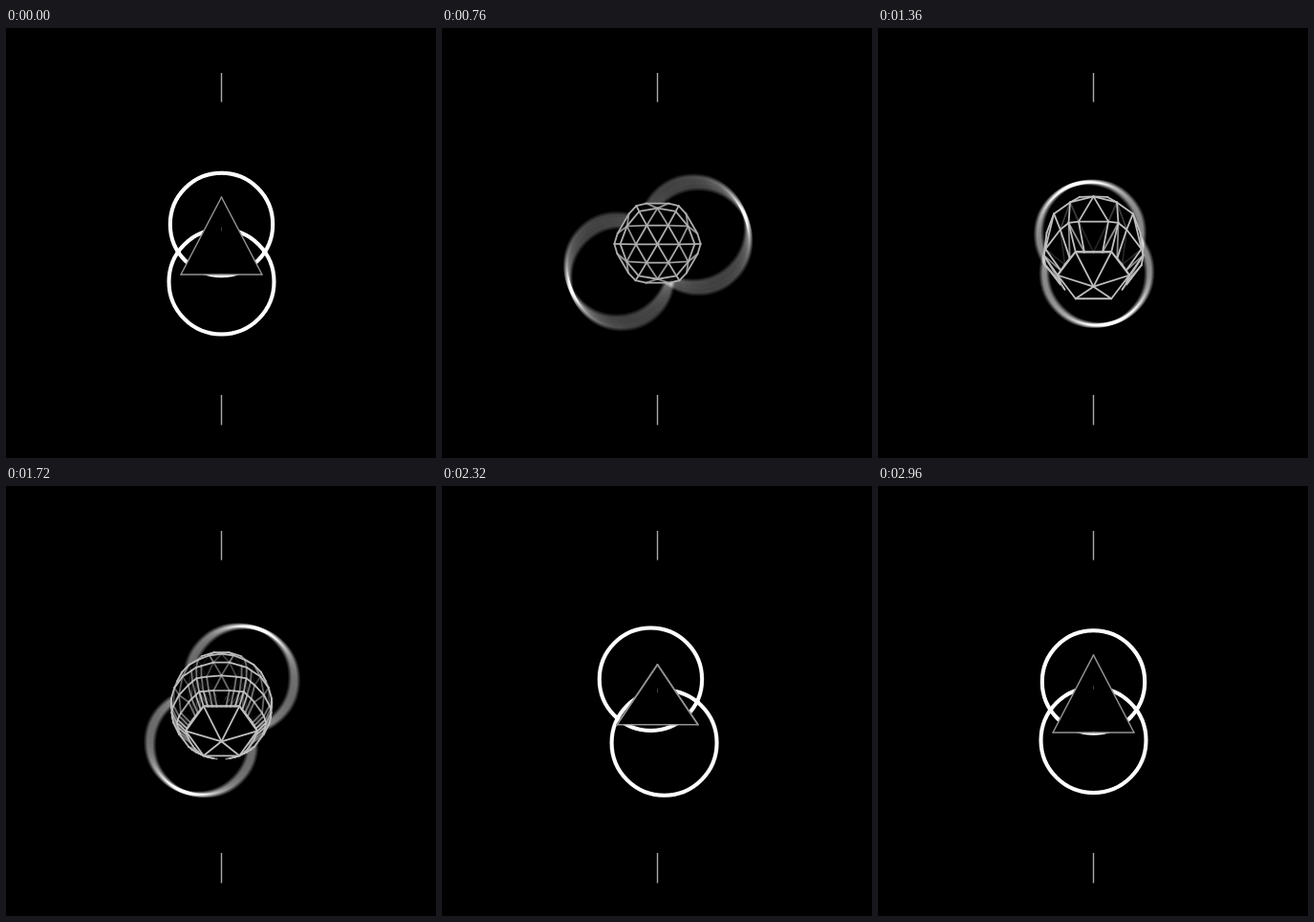
Write an HTML page with a canvas that moves like this. It is 450 px wide and 450 px high and loops after 3000 ms.

```html
<!DOCTYPE html>
<html lang="en">
<head>
<meta charset="utf-8">
<title>Rings and crystal</title>
<style>
html, body { margin: 0; width: 100%; height: 100%; overflow: hidden; background: #000; }
canvas { display: block; width: 450px; height: 450px; }
</style>
</head>
<body>
<canvas id="stage" width="450" height="450"></canvas>
<script>
const ctx = document.getElementById('stage').getContext('2d');
const LOOP = 3000, STEP = 40, SHUTTER = 30, SAMPLES = 20;
const CX = 225.5, CY = 235.5;

const lerp = (a, b, u) => a + (b - a) * u;
const clamp01 = u => Math.min(1, Math.max(0, u));
const ramp = (from, to, t) => {
  const u = clamp01((t - from) / (to - from));
  return u * u * (3 - 2 * u);
};

// Smooth monotone curve through [time, value] keys.
function curve(keys) {
  const slope = i => (keys[i + 1][1] - keys[i][1]) / (keys[i + 1][0] - keys[i][0]);
  const tangents = keys.map((_, i) => {
    if (i === 0 || i === keys.length - 1) return 0;
    const a = slope(i - 1), b = slope(i);
    return a * b <= 0 ? 0 : 2 * a * b / (a + b);
  });
  return t => {
    if (t <= keys[0][0]) return keys[0][1];
    if (t >= keys[keys.length - 1][0]) return keys[keys.length - 1][1];
    const i = keys.findIndex(k => k[0] > t) - 1;
    const [t0, v0] = keys[i], [t1, v1] = keys[i + 1];
    const h = t1 - t0, u = (t - t0) / h, w = 1 - u;
    return v0 * (1 + 2 * u) * w * w + tangents[i] * h * u * w * w
      + v1 * u * u * (3 - 2 * u) - tangents[i + 1] * h * u * u * w;
  };
}

const turn = curve([[0, 0], [240, 10], [520, 104], [1040, 450], [1360, 710],
  [1720, 932], [2000, 1034], [2320, 1068], [2960, 1080]]);
const spread = curve([[0, 30], [320, 46], [520, 50], [790, 44], [940, 34], [1040, 21],
  [1130, 16], [1360, 21], [1540, 29], [1720, 40], [1850, 51], [2320, 34], [2960, 30.5]]);
const tumble = curve([[0, 0], [520, 38], [1040, 165], [1360, 229], [1720, 233],
  [2320, 301], [3000, 360]]);

function drawRings(t) {
  ctx.globalCompositeOperation = 'lighter';
  ctx.strokeStyle = '#fff';
  ctx.lineWidth = 4;
  ctx.globalAlpha = 1 / SAMPLES;
  for (let i = 0; i < SAMPLES; i++) {
    const s = t + SHUTTER * ((i + 0.5) / SAMPLES - 0.5);
    const a = turn(s) * Math.PI / 180, r = spread(s);
    for (const [side, radius] of [[1, 53.7], [-1, 55]]) {
      ctx.beginPath();
      ctx.arc(CX + side * r * Math.sin(a), CY - side * r * Math.cos(a), radius, 0, 2 * Math.PI);
      ctx.stroke();
    }
  }
  ctx.globalAlpha = 1;
  ctx.globalCompositeOperation = 'source-over';
}

const dot = (a, b) => a[0] * b[0] + a[1] * b[1] + a[2] * b[2];
const sub = (a, b) => a.map((v, i) => v - b[i]);
const mix = (a, b, u) => a.map((v, i) => lerp(v, b[i], u));
const unit = a => a.map(v => v / Math.hypot(...a));
const cross = (a, b) => [a[1] * b[2] - a[2] * b[1], a[2] * b[0] - a[0] * b[2], a[0] * b[1] - a[1] * b[0]];
const around = (turns, radius, y) =>
  [radius * Math.sin(turns * Math.PI / 3), y, radius * Math.cos(turns * Math.PI / 3)];

// A vertex has a place on the pyramid and a direction on the ball.
const vertex = (flat, ball) => ({ flat, ball: unit(ball) });
const midpoint = (a, b) => vertex(mix(a.flat, b.flat, 0.5), mix(a.ball, b.ball, 0.5));

function subdivide([a, b, c], level) {
  if (level === 0) return [[a, b, c]];
  const ab = midpoint(a, b), bc = midpoint(b, c), ca = midpoint(c, a);
  return [[a, ab, ca], [ab, b, bc], [ca, bc, c], [ab, bc, ca]].flatMap(f => subdivide(f, level - 1));
}

// Pyramid whose side faces bulge; once round, its underside is subdivided.
function buildFaces(bulge, level) {
  const six = [0, 1, 2, 3, 4, 5], next = k => (k + 1) % 6;
  const rim = six.map(k => k % 2 ? around(k, 49, 20) : around(k, lerp(24.5, 56, bulge), lerp(20, 12, bulge)));
  const tip = vertex([0, -61, 0], [0, -1, 0]);
  const base = vertex([0, 20, 0], [0, 1, 0]);
  const ring = six.map(k => level
    ? vertex(mix(rim[k], rim[next(k)], 0.5), around(k + 0.5, 1, -1))
    : vertex(rim[k], rim[k]));
  const sides = six.map(k => [tip, ring[k], ring[next(k)]]);
  const under = level
    ? six.flatMap(k => subdivide([base, ring[k], ring[next(k)]], level))
    : [[ring[1], ring[3], ring[5]], ...[0, 2, 4].map(k => [ring[k], ring[k + 1], ring[(k + 5) % 6]])];
  return [...sides, ...under];
}

function drawCrystal(t) {
  const round = ramp(540, 920, t) * (1 - ramp(1900, 2240, t));
  const bulge = ramp(120, 520, t) * (1 - ramp(1950, 2260, t));
  const level = t < 720 || t >= 2120 ? 0 : t < 1540 ? 2 : 3;
  const angle = tumble(t) * Math.PI / 180;
  const sin = Math.sin(angle), cos = Math.cos(angle);
  const middle = lerp(228 + 10 * Math.cos(4 * Math.PI * t / LOOP), 230, round);

  const place = ({ flat, ball }) => {
    const [x, y, z] = mix(flat, [ball[0] * 53, ball[1] * 62, ball[2] * 53], round);
    return [x, y * cos - z * sin, y * sin + z * cos];
  };
  const path = points => {
    ctx.beginPath();
    points.forEach(([x, y]) => ctx.lineTo(CX + x, middle + y));
  };

  const edges = new Map();
  ctx.fillStyle = '#000';
  for (const face of buildFaces(bulge, level)) {
    const points = face.map(place);
    const normal = cross(sub(points[1], points[0]), sub(points[2], points[0]));
    if (Math.hypot(...normal) < 1) continue;
    const outward = unit(normal.map(v => v * Math.sign(dot(normal, points[0]))));
    if (outward[2] > 0) {
      path(points);
      ctx.fill();
    }
    points.forEach((a, i) => {
      const b = points[(i + 1) % 3];
      const key = [a, b].map(p => p.map(v => Math.round(v * 10)).join()).sort().join('|');
      const edge = edges.get(key) || { ends: [a, b], normals: [] };
      edge.normals.push(outward);
      edges.set(key, edge);
    });
  }

  const grey = lerp(145, 190, round);
  ctx.strokeStyle = `rgb(${grey},${grey},${grey})`;
  ctx.lineWidth = lerp(1.5, 1.8, Math.max(bulge, round));
  for (const { ends, normals } of edges.values()) {
    if (normals.every(n => n[2] <= 0)) continue;
    // Edges between coplanar faces stay invisible.
    ctx.globalAlpha = normals.length < 2 ? 1 : clamp01((1 - dot(normals[0], normals[1])) * 40);
    path(ends);
    ctx.stroke();
  }
  ctx.globalAlpha = 1;
}

function draw(t) {
  ctx.fillStyle = '#000';
  ctx.fillRect(0, 0, 450, 450);
  ctx.fillStyle = '#aaa';
  ctx.fillRect(224.8, 47, 1.4, 30.5);
  ctx.fillRect(224.8, 384, 1.4, 31.5);
  drawRings(t);
  drawCrystal(t);
}

ctx.lineJoin = ctx.lineCap = 'round';
const start = performance.now();
function tick() {
  const t = Math.max(0, performance.now() - start) % LOOP;
  draw(Math.floor(t / STEP) * STEP);
  requestAnimationFrame(tick);
}
tick();
</script>
</body>
</html>
```
